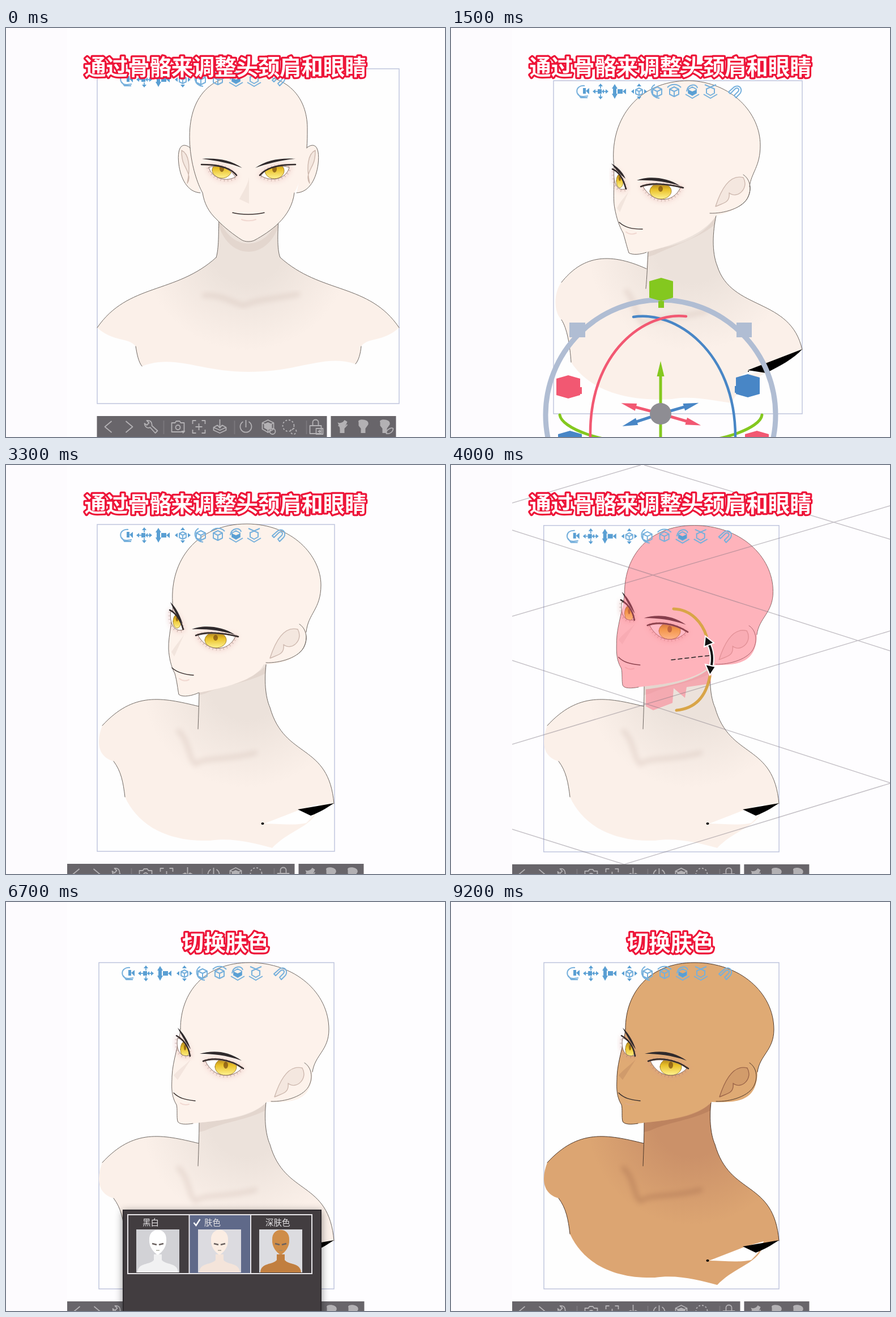
Write an HTML page that moves like this. It is 775 px wide and 722 px high and loops after 9.3 s.

```html
<!DOCTYPE html>
<html lang="zh">
<head>
<meta charset="utf-8">
<title>Bust pose</title>
<style>
html, body { margin: 0; width: 100%; height: 100%; overflow: hidden; background: #fdfbfe; }
svg { display: block; width: 775px; height: 722px;
  --skin: #fdf2eb; --body: #fbf0e9; --shade: #ece2db; --line: #6f6863; --soft: #cdb8ae; }
svg.dark { --skin: #dfaa74; --body: #dca572; --shade: #cb9169; --line: #4d382b; --soft: #9c6549; }
svg.mono #bust { filter: grayscale(1) brightness(1.03); }
#bust path { fill: none; stroke-linecap: round; stroke-linejoin: round; }
#bust .torso { fill: url(#torso); }
#bust .skin, #bust .ear { fill: var(--skin); }
#bust .line, #bust .ear { stroke: var(--line); stroke-width: 1; }
#bust .jaw { fill: var(--soft); opacity: .3; }
#bust .crease { stroke: var(--soft); stroke-width: 9; opacity: .32; filter: url(#blur); }
#bust .fold { stroke: var(--soft); stroke-width: 1.4; fill: var(--soft); fill-opacity: .2; }
#bust .nose { fill: var(--soft); opacity: .22; }
#bust .lip { stroke: #d9a8a0; stroke-width: 2; opacity: .35; }
#bust .white, #bust .gap { fill: #fff; }
#bust .blush { stroke: #d9918f; stroke-width: 9; opacity: .25; filter: url(#blur); }
#bust .lash { stroke: #8a6660; stroke-width: 8; stroke-dasharray: 1 5; stroke-linecap: butt; opacity: .35; }
#bust .under { stroke: #7b6259; stroke-width: .9; }
#bust .iris { fill: url(#iris); stroke: #9c7a24; stroke-width: .9; }
#bust .pupil { fill: #7a4a10; opacity: .7; }
#bust .lid { stroke: #332b2b; stroke-width: 2.5; }
#bust .brow { fill: #2f2a2c; }
#bust .mouth { stroke: #38302f; stroke-width: 1.5; }
#bust .dark { fill: #000; }
#bust .tint { fill: #ff5b78; opacity: .42; }
.title { font: 700 38.3px "Noto Sans CJK SC", "Noto Sans CJK JP", "Noto Sans CJK", sans-serif; text-anchor: middle;
  fill: #fff; stroke: #ee1539; stroke-width: 6.5; stroke-linejoin: round; paint-order: stroke; }
.label { font: 14.5px "Noto Sans CJK SC", "Noto Sans CJK JP", "Noto Sans CJK", sans-serif; fill: #e6e4e6; }
#tools { fill: none; stroke: #76b0dc; stroke-width: 2; stroke-linejoin: round; }
#tools .solid { fill: #5a9fd3; stroke: none; }
#bar path { fill: none; stroke: #b3b1b4; stroke-width: 1.8; stroke-linejoin: round; }
#bar .solid { fill: #b3b1b4; stroke: none; }
#ring path, #eyeRing path, #arc path { fill: none; stroke-linecap: round; }
</style>
</head>
<body>
<svg viewBox="0 0 775 722">
  <defs>
    <radialGradient id="torso" gradientUnits="userSpaceOnUse" cx="425" cy="385" r="185">
      <stop style="stop-color:var(--shade)"/><stop offset=".35" style="stop-color:var(--shade)"/>
      <stop offset="1" style="stop-color:var(--body)"/>
    </radialGradient>
    <linearGradient id="iris" x2="0" y2="1">
      <stop stop-color="#a87a1c"/><stop offset=".4" stop-color="#e9c028"/><stop offset="1" stop-color="#fff391"/>
    </linearGradient>
    <filter id="blur" x="-40%" y="-40%" width="180%" height="180%"><feGaussianBlur stdDeviation="4"/></filter>
    <filter id="shadow" x="-10%" y="-10%" width="120%" height="120%">
      <feDropShadow dx="0" dy="3" stdDeviation="7" flood-opacity=".45"/></filter>
    <clipPath id="view"><path d="M108 0H775V722H108Z"/></clipPath>
    <clipPath id="clipFar"><path id="cutFar"/></clipPath>
    <clipPath id="clipNear"><path id="cutNear"/></clipPath>
  </defs>
  <path d="M108 0H775V722H108Z" fill="#fefdff"/>
  <g clip-path="url(#view)">
    <rect id="frame" fill="#fefefe" stroke="#bcc2dc" stroke-width="1.4"/>
    <g id="bust"></g>
    <path id="grid" fill="none" stroke="#77707c" stroke-opacity=".42" stroke-width="1.5"
      d="M341 0L775 131M108 115L775 328M108 345L775 561M108 643L360 722M108 67L335 0M108 267L775 72M108 493L775 293M250 722L775 562"/>
    <g id="tools"></g>
    <g id="bar"></g>
  </g>

  <g id="arc">
    <path d="M393 254C425 255 444 280 451 302M457 373C450 410 430 430 398 433" stroke="#d9a548" stroke-width="5"/>
    <path d="M389 344L459 336" stroke="#222" stroke-width="1.5" stroke-dasharray="7 5"/>
    <path d="M455 316C462 330 462 345 459 358" stroke="#fff" stroke-width="8"/>
    <path d="M455 316C462 330 462 345 459 358" stroke="#111" stroke-width="4"/>
    <g fill="#111" stroke="#fff" stroke-width="2"><polygon points="449,302 464,314 447,321"/><polygon points="457,371 449,352 467,356"/></g>
  </g>

  <g id="ring">
    <circle cx="370" cy="683" r="203" fill="none" stroke="#b0bdd3" stroke-width="9"/>
    <path d="M209 520H237V546H209ZM504 520H531V546H504Z" style="fill:#b0bdd3"/>
    <path d="M192 683C195 705 260 735 370 735S547 705 549 683" stroke="#84c81f" stroke-width="5"/>
    <path d="M322 510C395 498 502 570 502 722" stroke="#4886c6" stroke-width="4.5"/>
    <path d="M415 509C345 500 243 570 246 722" stroke="#f25872" stroke-width="4.5"/>
    <g id="arrows"></g>
    <circle cx="370" cy="681" r="19" fill="#8e8d93"/>
    <g id="knobs"></g>
  </g>

  <g id="eyeRing">
    <path d="M310 232C325 255 400 265 440 292C455 296 465 297 478 295" stroke="#7fc41c" stroke-width="4.5"/>
    <path d="M412 175C445 182 464 215 463 255C460 310 420 360 376 350" stroke="#3f7ecb" stroke-width="4"/>
    <path d="M435 182C380 165 325 220 329 290C331 320 340 335 352 342" stroke="#ee4f68" stroke-width="4"/>
    <path d="M407 164H442V199H407ZM411 168H438V195H411Z" stroke="#e2bd7c" stroke-width="2"/>
  </g>

  <g id="panel">
    <rect x="207" y="544" width="349" height="200" fill="#423e41" stroke="#2f2c2f" stroke-width="2" filter="url(#shadow)"/>
    <rect id="pick" y="552" width="108" height="104" fill="#5f6989"/>
    <path d="M215 552H540V656H215ZM323.5 552V656M432 552V656" fill="none" stroke="#e8e6e9" stroke-width="2"/>
    <path id="tick" d="M0 0L4 5L11 -6" fill="none" stroke="#fff" stroke-width="2.4"/>
    <g id="cells"></g>
  </g>
  <text id="title1" class="title" x="387.5" y="83">通过骨骼来调整头颈肩和眼睛</text>
  <text id="title2" class="title" x="387.5" y="86">切换肤色</text>
</svg>
<script>
const $ = id => document.getElementById(id);
const root = document.querySelector('svg');
const NUM = /-?\d+(\.\d+)?/g;
const LOOP = 9300;

const shift = (d, dx, dy) => { let i = 0; return d.replace(NUM, n => +n + (i++ % 2 ? dy : dx)); };
const mirror = d => { let i = 0; return d.replace(NUM, n => i++ % 2 ? n : 856 - n); };
const oval = (x, y, rx, ry) => {
  const a = rx * .55, b = ry * .55;
  return `M${x - rx} ${y}C${x - rx} ${y - b} ${x - a} ${y - ry} ${x} ${y - ry}C${x + a} ${y - ry} ${x + rx} ${y - b} ${x + rx} ${y}` +
    `C${x + rx} ${y + b} ${x + a} ${y + ry} ${x} ${y + ry}C${x - a} ${y + ry} ${x - rx} ${y + b} ${x - rx} ${y}Z`;
};

// A shape holds one path per pose: front, turned, tilted, settled, raised.
const poses = (...list) => ({ text: list[4], poses: list.map(d => d.match(NUM).map(Number)) });
const shape = (front, turned, settled, raised, tilt = [-6, -4]) => poses(front, turned, shift(settled, ...tilt), settled, raised);
const torsoShape = (front, turned, rest) => poses(front, turned, shift(rest, -3, 0), rest, rest);
const blend = (s, p) => {
  const i = Math.min(3, Math.floor(p)), k = p - i;
  return s.poses[i].map((n, j) => n + (s.poses[i + 1][j] - n) * k);
};
const trace = (s, p) => { const v = blend(s, p); let i = 0; return s.text.replace(NUM, () => v[i++].toFixed(1)); };
const segments = (s, p, from, to) => {
  const v = blend(s, p).map(n => n.toFixed(1));
  return `M${v.slice(from * 6, from * 6 + 2).join(' ')}C${v.slice(from * 6 + 2, to * 6 + 2).join(' ')}`;
};

const torso = torsoShape(
  'M161 529C215 450 300 470 371 405C376 390 375 360 376 335C410 340 450 340 481 335C480 360 478 390 484 405C556 470 641 450 694 529C665 555 640 545 627 562C626 575 622 588 617 593C560 575 520 607 428 607C340 607 300 575 240 597C234 590 231 575 229 562C215 545 190 555 161 529',
  'M195 449C230 405 275 393 345 425C346 415 347 400 348 392C400 370 440 350 468 331C462 360 460 395 470 420C495 500 600 475 620 568C605 572 590 585 575 595C540 620 500 640 497 662C470 660 430 648 390 655C310 660 245 640 212 590C210 560 205 530 195 515C180 500 182 465 195 449',
  'M170 460C225 400 275 410 340 426C341 415 341 400 341 389C380 370 430 360 460 345C455 380 458 410 466 428C492 520 570 490 579 598C565 600 556 600 548 614C535 640 500 645 470 676C440 668 400 657 360 663C290 665 235 640 210 586C207 560 203 540 190 523C160 515 160 485 170 460');
const head = shape(
  'M325 212C318 135 350 82 428 82C505 82 533 130 532 180C532 190 532 200 531 212C528 245 518 275 509 291C504 335 465 360 440 374C434 378 422 378 416 374C402 365 385 352 372 338C358 325 350 310 347 291C338 275 328 245 325 212',
  'M287 236C282 160 330 93 420 93C495 95 546 150 546 207C546 245 530 255 527 280C525 310 500 325 468 331C440 375 360 390 345 396C335 400 320 401 314 397C311 388 308 376 304 362C297 350 292 335 289 318C285 300 290 262 287 236',
  'M294 242C290 170 335 104 425 104C505 104 556 160 556 212C556 255 533 262 530 295C530 335 500 352 455 352C440 385 360 398 340 402C330 407 312 411 305 405C303 395 302 382 298 368C291 355 288 340 287 325C286 300 297 265 294 242',
  'M308 224C308 160 350 107 430 107C510 107 570 160 570 225C570 262 545 270 541 300C540 350 510 355 460 353C430 385 350 388 330 391C318 393 305 393 303 387C301 380 303 365 301 358C290 340 293 322 293 308C294 280 306 250 308 224',
  [-3, -1]);
const neck = torsoShape('M376 335C375 360 376 390 371 405', 'M348 392C347 415 346 440 344 460', 'M341 389C341 415 340 440 339 466');
const jaw = torsoShape(
  'M376 338C400 395 455 395 481 338L481 350C460 410 396 410 376 350L376 338Z',
  'M348 392C395 385 440 375 467 333L465 348C435 372 390 385 360 400L348 404Z',
  'M341 389C390 385 435 380 460 353L458 368C425 385 385 388 350 404L341 406Z');
const crease = torsoShape('M350 472C380 470 400 485 420 490C440 480 470 478 515 470',
  'M310 465C325 480 325 510 340 522C355 510 400 515 450 500', 'M305 470C325 490 322 520 335 528C350 515 390 522 440 508');
const gap = torsoShape('M690 530L690 530L690 530C690 530 690 530 690 530C690 530 690 530 690 530Z',
  'M510 614L525 607L590 585C575 592 565 600 550 606C535 610 520 612 510 614Z',
  'M456 633L520 608L552 599C548 612 545 618 530 632C505 637 480 633 456 633Z');
const pit = torsoShape('M693 530L693 530L693 530C693 530 693 530 693 530Z',
  'M620 567L524 604L556 609C580 597 605 584 620 567Z', 'M579 597L515 608L538 619C552 614 567 605 579 597Z');
const speck = torsoShape(oval(690, 530, 0, 0), oval(525, 606, 1, 1), oval(453, 633, 2.5, 2));

const earFront = 'M530 212C548 198 554 215 551 240C548 265 536 290 513 291';
const foldFront = 'M546 216C533 222 530 245 536 274C528 262 538 250 542 240C546 232 546 222 546 216';
const earSide = 'M527 284C537 290 543 306 536 322C528 343 492 353 468 352';
const foldSide = 'M523 293C500 287 485 310 474 344C490 338 500 336 498 320C512 332 534 312 523 293';
const hidden = 'M340 240C335 240 335 250 335 255C335 260 340 265 345 265';
const hiddenFold = 'M340 250C340 250 340 255 340 255C340 255 342 255 342 255C342 255 340 250 340 250';
const ear = shape(earFront, shift(earSide, -11, -25), shift(earSide, -9, -3), earSide);
const fold = shape(foldFront, shift(foldSide, -7, -29), shift(foldSide, -8, -3), foldSide);
const farEar = shape(mirror(earFront), hidden, hidden, hidden);
const farFold = shape(mirror(foldFront), hiddenFold, hiddenFold, hiddenFold);

const nearShape = (front, settled, raised) => shape(front, shift(settled, 0, -21), settled, raised);
const near = {
  white: nearShape('M450 261C460 245 485 241 500 246C496 264 472 274 450 261', 'M339 301C352 296 385 297 405 303C392 331 356 331 339 301', 'M352 281C366 276 398 279 416 294C400 311 368 313 352 281'),
  lid: nearShape('M448 260C462 243 490 241 511 241', 'M335 301C350 294 380 295 410 303', 'M348 281C364 274 395 276 419 294'),
  brow: nearShape('M440 247C460 233 485 229 511 231C485 233 460 240 440 247', 'M328 290C346 282 380 283 405 300C378 291 350 289 328 290', 'M342 268C362 262 390 261 416 280C388 270 365 268 342 268'),
  iris: nearShape(oval(474, 252, 17, 14), oval(370, 309, 19, 14), oval(388, 291, 19, 15)),
  pupil: nearShape(oval(474, 249, 4, 6), oval(370, 305, 4, 5), oval(388, 288, 4, 6))
};
const far = {
  white: shape('M405 263C395 246 372 241 358 246C362 262 385 274 405 263', 'M308 284C304 268 297 256 288 251C286 268 291 290 308 284', 'M312 291C308 274 300 262 291 258C288 275 295 296 312 291', 'M324 271C322 255 312 243 303 240C300 255 304 276 324 271'),
  lid: shape('M407 260C394 243 366 241 345 241', 'M309 284C304 265 295 253 285 249', 'M313 290C308 272 298 260 289 256', 'M325 272C322 252 312 242 301 236'),
  brow: shape('M417 247C397 233 372 229 346 231C372 234 397 239 417 247', 'M308 266C303 254 294 245 283 239C291 250 299 259 308 266', 'M312 281C307 264 299 250 290 242C296 256 304 270 312 281', 'M326 260C321 244 312 230 303 222C309 234 317 248 326 260'),
  iris: shape(oval(381, 251, 17, 14), oval(298, 270, 6, 12), oval(302, 276, 7, 12), oval(316, 260, 8, 14)),
  pupil: shape(oval(381, 248, 4, 6), oval(298, 266, 2, 4), oval(302, 272, 2, 4), oval(316, 257, 2, 5))
};
const nose = shape('M429 263C428 275 418 290 412 302L429 310Z', 'M313 290C305 300 296 310 293 318L298 325Z', 'M314 300C306 311 298 320 292 330L297 338Z', 'M326 278C316 288 302 298 296 306L303 314Z');
const mouth = shape('M400 326C415 330 440 330 456 326', 'M297 343C307 352 318 355 338 355', 'M293 358C303 367 315 370 331 371', 'M296 337C305 346 315 349 334 351');
const lip = shape('M416 338C422 341 434 341 441 338', 'M309 360C314 364 320 365 327 362', 'M306 377C311 381 317 382 323 379', 'M308 355C312 358 317 359 323 357');

const parts = [];
const add = (cls, s, opt = {}) => {
  const el = document.createElementNS(root.namespaceURI, 'path');
  el.setAttribute('class', cls);
  if (opt.clip) el.setAttribute('clip-path', `url(#${opt.clip})`);
  $('bust').append(el);
  parts.push({ el, draw: opt.seg ? p => segments(s, p, ...opt.seg) : p => trace(s, p) });
  return el;
};
const addEye = (e, clip) => {
  add('blush', e.white);
  add('lash', e.white);
  add('white', e.white);
  add('iris', e.iris, { clip });
  add('pupil', e.pupil, { clip });
  add('under', e.white);
  add('lid', e.lid);
  add('brow', e.brow);
};

add('torso', torso);
add('jaw', jaw);
add('crease', crease);
add('gap', gap);
add('dark', pit);
add('dark', speck);
add('line', torso, { seg: [0, 1] });
add('line', torso, { seg: [3, 5] });
add('line', torso, { seg: [9, 10] });
const frontOnly = [add('line', torso, { seg: [6, 7] })];
add('line', neck);
add('ear', farEar);
add('fold', farFold);
add('ear', ear);
add('skin', head);
add('line', head, { seg: [0, 3] });
add('line', head, { seg: [5, 9] });
frontOnly.push(add('line', head, { seg: [4, 5] }));
const sideEar = add('line', ear);
add('fold', fold);
add('nose', nose);
addEye(far, 'clipFar');
addEye(near, 'clipNear');
add('mouth', mouth);
add('lip', lip);
const tint = [add('tint', head), add('tint', torsoShape(...Array(3).fill(
  'M344 396L344 426L357 433L391 420L393 394L413 411L416 392L458 386L462 352C443 382 363 394 344 396Z')))];
const eyeTint = add('tint', far.white);

// Interface drawing
const put = (id, html) => { $(id).innerHTML = html; };
const icon = (x, d, solid = '') => `<g transform="translate(${x} 19)"><path d="${d}"/><path class="solid" d="${solid}"/></g>`;
const cube = 'M0 -8L8 -4V5L0 9L-8 5V-4ZM-8 -4L0 0L8 -4M0 0V9';
const camera = 'M-3 -4H6V4H-3ZM6 0L12 -5V5Z';
const tips = 'M0 -14L4 -9H-4ZM0 14L4 9H-4ZM-14 0L-9 -4V4ZM14 0L9 -4V4Z';
const slab = 'M-12 5L0 12L12 5M-7 -4L0 -8L7 -4V3L0 7L-7 3Z';
put('tools', icon(51, 'M4 -10C-14 -12 -14 10 2 9L10 8M-8 4L-3 11L9 11', 'M1 -6H6V4H1ZM6 -1L12 -6V5Z') +
  icon(83, 'M-9 0H-5M5 0H9M0 -9V-5M0 5V9', tips + 'M-5 -4H2V4H-5ZM2 0L6 -4V4Z') +
  icon(116, '', 'M-8 -13L-3 -5H-5V4H-3L-8 13L-13 4H-11V-5H-13Z' + camera) +
  icon(151, 'M0 -6L6 -3V4L0 7L-6 4V-3ZM-6 -3L0 0L6 -3M0 0V7', tips) +
  icon(183, cube + 'M-4 -12C-14 -8 -13 10 4 12') + icon(213, cube + 'M-12 -7C-6 -14 6 -14 12 -7') +
  icon(245, slab + 'M-10 0C-8 -14 8 -14 9 -6', 'M0 0L7 -3V3L0 7L-7 3V-3Z') + icon(277, slab + 'M-10 -12L8 -4M10 -12L-8 -4') +
  icon(320, 'M-11 1L-1 -8C10 -14 15 -1 8 5L2 11L-1 7L6 0C9 -5 4 -8 0 -4L-8 4Z'));

const palm = 'M-8 -8C-12 -15 12 -15 9 -4L4 3V11H-4V3L-8 -2Z';
put('bar', '<rect width="406" height="60" fill="#68656a"/><rect x="413" width="115" height="60" fill="#68656a"/>' +
  '<path d="M118 8V32M243 8V32M370 8V32" style="stroke:#7b787d"/>' +
  icon(20, 'M6 -10L-6 0L6 10') + icon(57, 'M-6 -10L6 0L-6 10') +
  icon(95, 'M-11 -6C-10 2 -4 3 -1 1L8 11L12 7L2 -2C3 -9 -2 -12 -7 -11L-3 -7L-7 -3Z') +
  icon(143, 'M-11 -7H-5L-3 -10H3L5 -7H11V9H-11ZM4 1A4 4 0 1 0 -4 1A4 4 0 1 0 4 1', 'M6 7H13L9 12Z') +
  icon(180, 'M-11 -5V-11H-5M5 -11H11V-5M11 5V11H5M-5 11H-11V5M-6 0H6M0 -6V6') +
  icon(217, 'M-4 -3L-11 1V6L0 11L11 6V1L4 -3M-11 1L0 6L11 1M0 -13V1M-4 -3L0 2L4 -3') +
  icon(263, 'M-5 -9A10 10 0 1 0 5 -9M0 -12V1') +
  icon(302, 'M0 -12L10 -7V4L0 10L-10 4V-7ZM-10 -7L0 -2L10 -7M0 -2V10M13 8A5 5 0 1 0 3 8A5 5 0 1 0 13 8', 'M0 -8L7 -5V2L0 6L-7 2V-5Z') +
  `<g stroke-dasharray="3 3">${icon(339, 'M9 -2A10 10 0 1 0 -11 -2A10 10 0 1 0 9 -2M13 8A5 5 0 1 0 3 8A5 5 0 1 0 13 8')}</g>` +
  icon(386, 'M-10 -2H10V12H-10ZM-5 -2V-8C-5 -14 5 -14 5 -8V-2M1 3H13V13H1ZM7 5V11M4 8H10') +
  icon(433, 'M-7 -2C2 0 6 -5 8 -9M-4 4C3 4 6 0 9 -4', 'M-8 -8C-4 -5 2 -8 4 -12L9 -9L4 3V11H-4V3Z') +
  icon(470, '', palm) + icon(508, 'M3 8C7 3 12 1 15 3C15 9 9 13 3 12Z', palm));

const arrow = (angle, len, color) => `<g transform="translate(370 681) rotate(${angle})" fill="${color}">` +
  `<path d="M0 0H${len - 20}" style="stroke:${color};stroke-width:5"/><polygon points="${len},0 ${len - 27},-6.5 ${len - 27},6.5"/></g>`;
put('arrows', arrow(-90, 93, '#84c81f') + arrow(90, 93, '#84c81f') + arrow(195, 72, '#f25872') + arrow(16, 74, '#f25872') +
  arrow(-16, 70, '#4886c6') + arrow(162, 71, '#4886c6'));
const knob = (x, y, color, stem) => `<g transform="translate(${x} ${y})" fill="${color}">` +
  `<polygon points="-21,-15 0,-21 21,-15 21,14 0,20 -21,14"/><rect x="${stem[0]}" y="${stem[1]}" width="10" height="12"/></g>`;
put('knobs', knob(371, 462, '#84c81f', [-5, 20]) + knob(207, 634, '#f25872', [14, 0]) + knob(524, 632, '#4886c6', [-23, 0]) +
  knob(210, 732, '#4886c6', [14, 0]) + knob(540, 732, '#f25872', [-23, 0]));

const cell = (x, name, skin, shade, back) => `<text class="label" x="${x + 26}" y="571">${name}</text>` +
  `<g transform="translate(${x + 15} 578)"><path d="M0 0H76V76H0Z" fill="${back}"/>` +
  `<path d="M2 76C3 58 24 63 31 54V44H45V54C52 63 73 58 74 76Z" fill="${shade}"/>` +
  `<path d="M23 18C22 -5 54 -5 53 18C54 31 45 41 38 45C31 41 22 31 23 18Z" fill="${skin}"/>` +
  '<path d="M28 25L36 27M48 25L40 27" stroke="#6b6361" stroke-width="2.5"/><path d="M35 37H41" stroke="#887"/></g>';
put('cells', cell(215, '黑白', '#fff', '#f1f1f2', '#d2d2d6') + cell(324, '肤色', '#fbede3', '#f4e4da', '#dcdbe0') +
  cell(432, '深肤色', '#cf8d49', '#c17f40', '#dcdce0'));

const KEYS = [[0, 0], [200, 0], [1100, 1], [1900, 1], [2300, 2], [2700, 2], [3000, 3], [3600, 3], [4100, 4], [LOOP, 4]];
const FRAMES = { poses: [[161, 72, 694, 663], [181, 93, 620, 681], [162, 104, 575, 682], [161, 105, 580, 682], [164, 107, 579, 683]] };
const poseAt = t => {
  const i = KEYS.findIndex(k => t < k[0]), [a, p] = KEYS[i - 1], [b, q] = KEYS[i];
  const k = (t - a) / (b - a);
  return p + (q - p) * k * k * (3 - 2 * k);
};
const show = (el, on) => { el.style.display = on ? '' : 'none'; };

function render(t) {
  const p = poseAt(t), within = (a, b) => t >= a && t < b;
  parts.forEach(({ el, draw }) => el.setAttribute('d', draw(p)));
  $('cutFar').setAttribute('d', trace(far.white, p));
  $('cutNear').setAttribute('d', trace(near.white, p));
  frontOnly.forEach(el => { el.style.opacity = Math.max(0, 1 - p * 2); });
  sideEar.style.opacity = Math.min(1, p);

  const [l, top, r, bottom] = blend(FRAMES, p), frame = $('frame');
  Object.entries({ x: l, y: top, width: r - l, height: bottom - top }).forEach(([k, v]) => frame.setAttribute(k, v));
  $('tools').setAttribute('transform', `translate(${l} ${top})`);
  $('bar').setAttribute('transform', `translate(${(l + r) / 2 - 267} ${bottom + 22})`);

  const ring = within(1100, 1900), bone = within(2100, 3000) || within(3600, 4100);
  show($('ring'), ring);
  show($('bar'), !ring);
  show($('grid'), bone || within(1900, 2100));
  show($('arc'), bone);
  tint.forEach(el => show(el, bone));
  show($('eyeRing'), within(4300, 5000));
  show(eyeTint, within(4300, 5000));
  show($('title1'), t < 5000);
  show($('title2'), t >= 5100);

  const pick = t < 7000 ? 1 : t < 8200 ? 0 : 2;
  root.setAttribute('class', ['mono', '', 'dark'][pick]);
  show($('panel'), within(5700, 8800));
  $('pick').setAttribute('x', 215 + pick * 108.5);
  $('tick').setAttribute('transform', `translate(${223 + pick * 108.5} 566)`);
}

function tick(now) {
  render(Math.floor(now % LOOP / 100) * 100);
  requestAnimationFrame(tick);
}
render(0);
requestAnimationFrame(tick);
</script>
</body>
</html>
```
